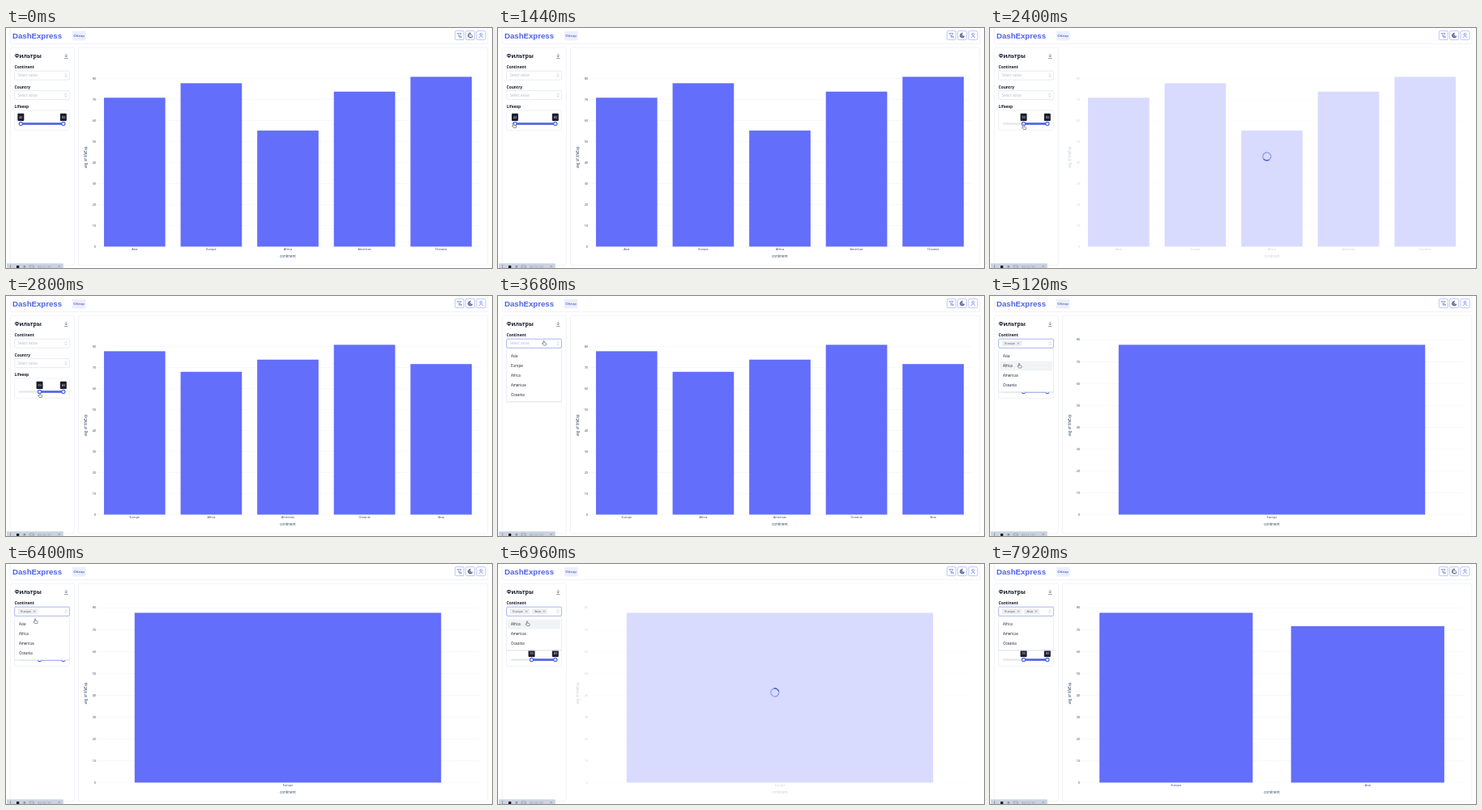
These frames come from a looping animation (600 px wide and 297 px high, 8000 ms). An HTML page:

```html
<!DOCTYPE html>
<html lang="ru">
<head>
<meta charset="utf-8">
<title>Dashboard</title>
<style>
html, body { margin: 0; width: 100%; height: 100%; overflow: hidden; background: #fff; }
svg { display: block; width: 100vw; height: 100vh; font-family: "Open Sans", "Noto Sans", sans-serif; }
</style>
</head>
<body>
<svg id="stage" viewBox="0 0 600 297" preserveAspectRatio="none">
  <g id="frame"></g>
  <g id="chart"></g>
  <g id="loader">
    <rect x="89" y="23.5" width="506.5" height="271" rx="1.5" fill="#fff" opacity=".75"/>
    <g id="spin" fill="none" stroke="#4c63d2" stroke-width="1.3">
      <circle r="5" opacity=".5"/>
      <path d="M0-5A5 5 0 0 1 5 0"/>
    </g>
  </g>
  <g id="slider"></g>
  <g id="select"></g>
  <g id="list"></g>
  <g id="bar"></g>
  <g id="hand">
    <path d="M-1.1-2.6c0-.9 1.2-.9 1.2 0v1.8l2 .5c.5.1.7.4.6.9l-.4 1.9H-.9L-2.4.6c-.4-.6.3-1 .8-.6l.5.5z"
      fill="#fff" stroke="#3d4254" stroke-width=".55" stroke-linejoin="round"/>
  </g>
</svg>
<script>
const LOOP = 8000;
const BLUE = '#4c63e6', BAR = '#636efa', DARK = '#1b1e2e', LINE = '#e6e9f0', AXIS = '#2a3f5f';
const $ = id => document.getElementById(id);

const rect = (x, y, w, h, fill, extra = '') =>
  `<rect x="${x}" y="${y}" width="${w}" height="${h}" fill="${fill}" ${extra}/>`;
const box = (x, y, w, h, stroke = LINE, rx = 1.2, sw = .6) =>
  rect(x, y, w, h, '#fff', `stroke="${stroke}" stroke-width="${sw}" rx="${rx}"`);
const text = (x, y, s, size, fill, extra = '') =>
  `<text x="${x}" y="${y}" font-size="${size}" fill="${fill}" ${extra}>${s}</text>`;
const path = (d, stroke, sw = .6, fill = 'none') =>
  `<path d="${d}" fill="${fill}" stroke="${stroke}" stroke-width="${sw}" stroke-linecap="round" stroke-linejoin="round"/>`;
const MID = 'text-anchor="middle"', BOLD = 'font-weight="700"';

// Rewrites a group only when its content changes
const cache = {};
function put(id, html) {
  if (cache[id] !== html) $(id).innerHTML = cache[id] = html;
}

const chevrons = y => path(`M72.9 ${y - .9}l1-1 1 1M72.9 ${y + .9}l1 1 1-1`, '#8a92a3', .45);

function drawFrame() {
  const buttons = [554.3, 567.6, 581].map(x => box(x, 3.6, 11, 11, '#93a0ee', 1.3)).join('');
  put('frame',
    box(5.3, -2, 589.5, 21.5) + box(5.3, 24.3, 79, 269.5) + box(89.5, 24.3, 505.3, 269.5) +
    text(8, 13.3, 'DashExpress', 9.63, BLUE, BOLD + ' font-family="Liberation Sans, sans-serif"') +
    rect(81.8, 4, 16.6, 11.6, '#eceffc', 'rx="1.3"') +
    text(90.1, 11.4, 'Обзор', 4.3, '#4459d0', MID + ' font-weight="600"') +
    buttons +
    path('M557.4 6.6h4.6l-1.8 2.3v2.6l-1.2-.6v-2zM561 10.2l1.5 1.5M562.5 10.2l-1.5 1.5', BLUE, .6) +
    path('M573.2 6.3a2.9 2.9 0 1 0 2.8 3.8 2.5 2.5 0 0 1-2.8-3.8z', '#414b78', .6, '#7c84a8') +
    path('M584.2 12c0-2.8 4.6-2.8 4.6 0M585.1 7.8a1.4 1.4 0 1 0 2.8 0 1.4 1.4 0 0 0-2.8 0', BLUE, .6) +
    text(10.6, 37.4, 'Фильтры', 6.9, DARK, BOLD) +
    path('M74.2 32.2v3.4M73 34.6l1.2 1.2 1.2-1.2M72.2 37.6h4', '#5d6475', .65) +
    text(10.6, 50.2, 'Continent', 4.85, DARK, BOLD) +
    text(10.6, 74.8, 'Country', 4.85, DARK, BOLD) +
    box(10.6, 77.6, 67.8, 11, '#d9dde6') +
    text(14.6, 84.7, 'Select value', 4.4, '#b3b9c6') + chevrons(83.1) +
    text(10.6, 99.3, 'Lifeexp', 4.85, DARK, BOLD));
}

const CHARTS = [
  [['Asia', 70.8], ['Europe', 77.7], ['Africa', 55.2], ['Americas', 73.7], ['Oceania', 80.75]],
  [['Europe', 77.7], ['Africa', 67.9], ['Americas', 73.7], ['Oceania', 80.75], ['Asia', 71.6]],
  [['Europe', 77.7]],
  [['Europe', 77.7], ['Asia', 71.6]]
];

function drawChart(rows) {
  const x0 = 111.5, w = 473, y0 = 270.5;
  const unit = 210.1 / Math.max(...rows.map(r => r[1])), step = w / rows.length;
  let out = '';
  for (let v = 0; v <= 80; v += 10) {
    const y = y0 - v * unit;
    out += rect(x0, y - .15, w, .35, '#e8ecf5') + text(111, y + 1.3, v, 3.75, AXIS, 'text-anchor="end"');
  }
  rows.forEach(([name, v], i) => {
    const x = x0 + i * step;
    out += rect(x + step * .1, y0 - v * unit, step * .8, v * unit, BAR) +
      text(x + step / 2, 275, name, 3.75, AXIS, MID);
  });
  put('chart', out + text(348, 283.6, 'continent', 4.4, AXIS, MID) +
    text(0, 0, 'avg of lifeExp', 4.4, AXIS, MID + ' transform="translate(99.6 160) rotate(-90)"'));
}

function drawSlider(x) {
  const tip = (cx, v) => rect(cx - 4, 105.7, 8, 9.2, DARK, 'rx="1"') +
    text(cx, 111.7, v, 3.7, '#fff', MID);
  const knob = cx => `<circle cx="${cx}" cy="118.5" r="2.1" fill="#fff" stroke="${BLUE}" stroke-width="1.2"/>`;
  const low = Math.round(40 + (x - 18.3) / 52.5 * 43);
  put('slider', box(10.6, 102, 67.8, 24.4) +
    rect(15.8, 117.2, 57.4, 2.6, '#e6e9ee', 'rx="1.3"') +
    rect(x, 117.2, 70.8 - x, 2.6, BLUE) +
    knob(x) + knob(70.8) + tip(x, low) + tip(70.8, 83));
}

function drawSelect(tags, open) {
  let out = box(10.6, 53.2, 67.8, 11, open ? '#6f82ec' : '#d9dde6') + chevrons(58.7);
  if (!tags.length) out += text(14.6, 60.3, 'Select value', 4.4, '#b3b9c6');
  let x = 14.8;
  for (const tag of tags) {
    const w = tag === 'Europe' ? 24.4 : 19;
    out += rect(x, 55.2, w, 6.8, '#eceef3', 'rx="1"') + text(x + 3.5, 60, tag, 3.8, '#4d566b') +
      path(`M${x + w - 5} 57.8l1.7 1.7m0-1.7l-1.7 1.7`, '#5d6475', .45);
    x += w + 2.8;
  }
  put('select', out);
}

function drawList(tags, open, tipX, tipY) {
  if (!open) return put('list', '');
  const items = ['Asia', 'Europe', 'Africa', 'Americas', 'Oceania'].filter(n => !tags.includes(n));
  const h = items.length * 12 + 5.2;
  let out = rect(10.2, 66, 68.8, h + .6, '#dfe2ea', 'rx="1.5" opacity=".7"') + box(10.6, 65.4, 67.8, h, LINE, 1.2);
  items.forEach((name, i) => {
    const y = 68.4 + i * 12;
    if (tipX > 12 && tipX < 77 && tipY >= y && tipY < y + 12) out += rect(12, y, 65, 12, '#f1f3f5', 'rx="1"');
    out += text(16, y + 7.4, name, 4.4, DARK);
  });
  put('list', out);
}

function drawBar(t) {
  const sec = String(12 + Math.floor(t / 1000)).padStart(2, '0');
  put('bar', rect(1, 291.3, 69.8, 6, '#cbd2e0') +
    rect(5, 293, .7, 4, '#7d869c') + rect(13, 294, 3.2, 3, '#11131c') +
    rect(21.5, 294, 2.6, 2.6, '#8c95aa') +
    path('M29.6 294h4.6v3h-4.6z', '#7d869c', .6) +
    text(39, 297.3, '00:' + sec + ' / 01', 3.8, '#8a93a8') +
    path('M64.8 294l2 2m0-2l-2 2', '#6b7fc9', .5));
}

// Pointer and slider paths: [time, x, y]
const POINTER = [[0, 573, 9], [320, 573, 9], [1120, 18, 121], [1360, 18.5, 121], [1440, 20, 121],
  [2000, 42, 123], [2800, 42, 123], [3520, 57, 58.5], [3760, 57, 58.5], [4160, 36.5, 86.5],
  [5920, 36.5, 86.5], [6240, 36.5, 71], [6400, 36.5, 71], [6560, 36.5, 74], [7360, 36.5, 74], [7840, 573, 9], [8000, 573, 9]];
const KNOB = [[0, 18.3, 0], [1280, 18.3, 0], [1440, 20.9, 0], [2000, 41.5, 0], [8000, 41.5, 0]];

function along(keys, t) {
  let i = 1;
  while (i < keys.length - 1 && t >= keys[i][0]) i++;
  const [a, b] = [keys[i - 1], keys[i]];
  const p = (t - a[0]) / (b[0] - a[0]), e = p * p * (3 - 2 * p);
  return [a[1] + (b[1] - a[1]) * e, a[2] + (b[2] - a[2]) * e];
}

const LOADS = [[2080, 2640], [4480, 5120], [6720, 7360]];

function draw(t) {
  const [x, y] = along(POINTER, t);
  const tags = t < 4240 ? [] : t < 6560 ? ['Europe'] : ['Europe', 'Asia'];
  const open = t >= 3600;
  drawChart(CHARTS[LOADS.filter(l => t >= l[1]).length]);
  drawSlider(along(KNOB, t)[0]);
  drawSelect(tags, open);
  drawList(tags, open, x, y - 3);
  drawBar(t);
  const busy = LOADS.some(l => t >= l[0] && t < l[1]);
  $('loader').style.display = busy ? '' : 'none';
  $('spin').setAttribute('transform', `translate(341.8 159) rotate(${t * .36 % 360})`);
  $('hand').setAttribute('transform', `translate(${x} ${y})`);
}

drawFrame();
const start = performance.now();
function tick() {
  draw((performance.now() - start) % LOOP);
  requestAnimationFrame(tick);
}
tick();
</script>
</body>
</html>
```
